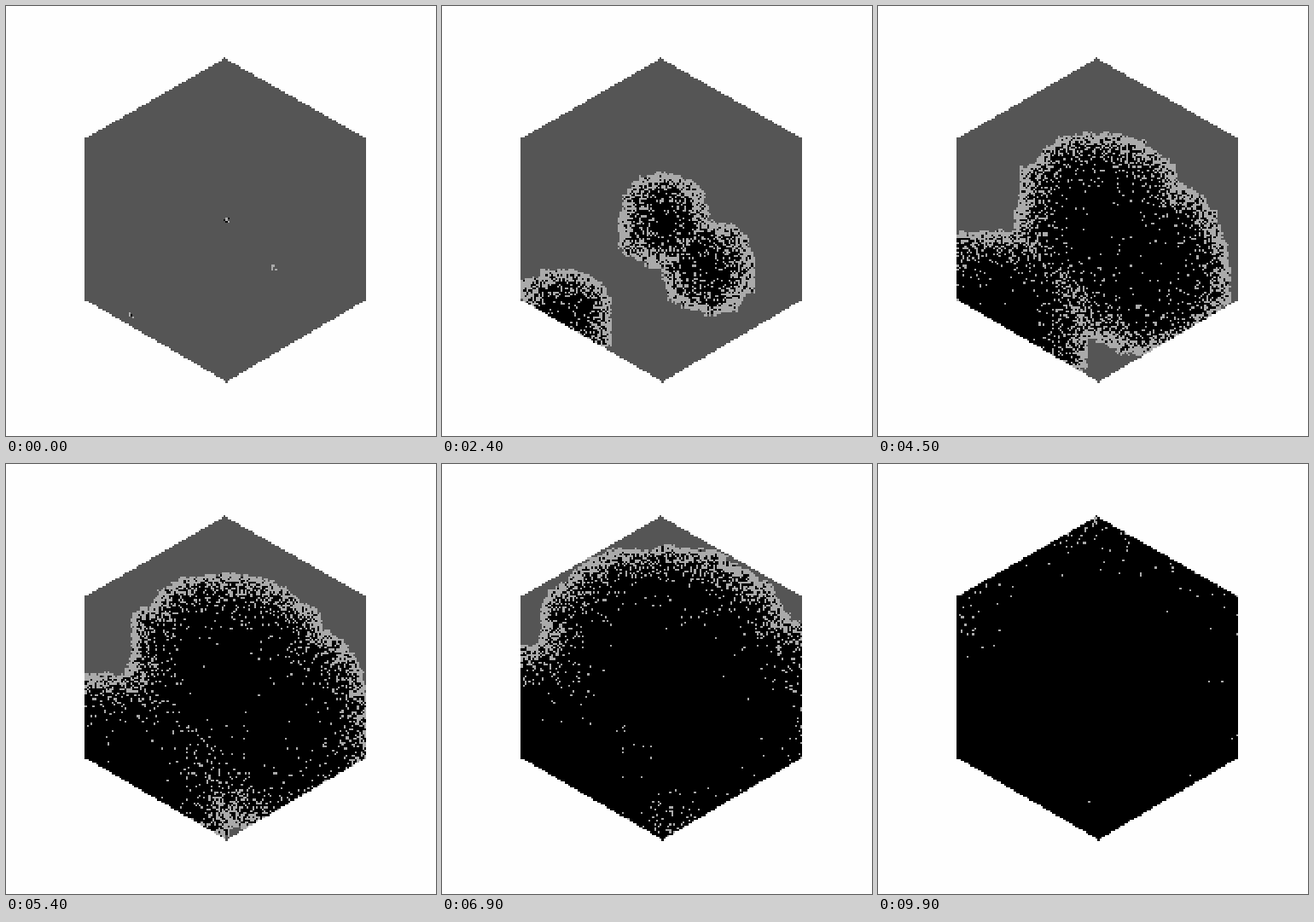
An HTML page with a canvas that plays this animation: 504 by 504 pixels, repeating every 10000 ms.

```html
<!DOCTYPE html>
<html lang="en">
<head>
<meta charset="utf-8">
<title>Spreading cells in a hexagon</title>
<style>
  html, body { margin: 0; width: 100%; height: 100%; overflow: hidden; background: #fefefe; }
  canvas { position: absolute; left: 1px; top: 0; width: 504px; height: 504px; image-rendering: pixelated; }
</style>
</head>
<body>
<canvas id="grid" width="226" height="226"></canvas>
<script>
const SIZE = 226, STEPS = 100, STEP_MS = 100;
const SPREAD = 0.43;  // chance per active neighbour and step
const FADE = 0.12;    // chance per step that an active cell turns black
const NEVER = 255;

const HEXAGON = [[41, 69], [114, 27], [188, 69], [188, 154], [115, 197], [41, 154]];

// "+" is active, "#" is already black
const SEEDS = [
  { x: 115, y: 112, rows: ['.+#', '#+.', '.#+'] },
  { x: 140, y: 137, rows: ['++.', '+..', '+.+'] },
  { x: 65, y: 162, rows: ['+..', '+#.', '..+'] }
];

let state = 20417;
function random() {
  state = (state + 0x6D2B79F5) | 0;
  let t = Math.imul(state ^ (state >>> 15), 1 | state);
  t = (t + Math.imul(t ^ (t >>> 7), 61 | t)) ^ t;
  return ((t ^ (t >>> 14)) >>> 0) / 4294967296;
}

function inHexagon(x, y) {
  return HEXAGON.every(([ax, ay], i) => {
    const [bx, by] = HEXAGON[(i + 1) % HEXAGON.length];
    return (bx - ax) * (y - ay) - (by - ay) * (x - ax) >= 0;
  });
}

// For each cell: the step at which it lights up and the step at which it turns black
const inside = new Uint8Array(SIZE * SIZE);
const litAt = new Uint8Array(SIZE * SIZE).fill(NEVER);
const blackAt = new Uint8Array(SIZE * SIZE).fill(NEVER);
const around = [-SIZE - 1, -SIZE, -SIZE + 1, -1, 1, SIZE - 1, SIZE, SIZE + 1];

function simulate() {
  let active = [];
  for (let i = 0; i < inside.length; i++) {
    inside[i] = inHexagon(i % SIZE, Math.floor(i / SIZE)) ? 1 : 0;
  }
  for (const { x, y, rows } of SEEDS) {
    rows.forEach((row, dy) => [...row].forEach((mark, dx) => {
      const cell = (y + dy - 1) * SIZE + x + dx - 1;
      if (mark === '.' || !inside[cell]) return;
      litAt[cell] = 0;
      if (mark === '#') blackAt[cell] = 0;
      else active.push(cell);
    }));
  }
  for (let step = 1; step < STEPS; step++) {
    const next = [];
    for (const cell of active) {
      for (const offset of around) {
        const other = cell + offset;
        if (inside[other] && litAt[other] === NEVER && random() < SPREAD) {
          litAt[other] = step;
          next.push(other);
        }
      }
      if (random() < FADE) blackAt[cell] = step;
      else next.push(cell);
    }
    active = next;
  }
}

const ctx = document.getElementById('grid').getContext('2d');
const image = ctx.createImageData(SIZE, SIZE);
const pixels = new Uint32Array(image.data.buffer);
const gray = level => (0xff000000 | level * 0x010101) >>> 0;
const PAPER = gray(0xfe), IDLE = gray(0x55), LIT = gray(0xaa), BLACK = gray(0);

function draw(step) {
  for (let i = 0; i < pixels.length; i++) {
    pixels[i] = !inside[i] ? PAPER
      : blackAt[i] <= step ? BLACK
      : litAt[i] <= step ? LIT
      : IDLE;
  }
  ctx.putImageData(image, 0, 0);
}

let shown = -1;
function tick() {
  const step = Math.floor(performance.now() / STEP_MS) % STEPS;
  if (step !== shown) draw(shown = step);
  requestAnimationFrame(tick);
}

simulate();
tick();
</script>
</body>
</html>
```
